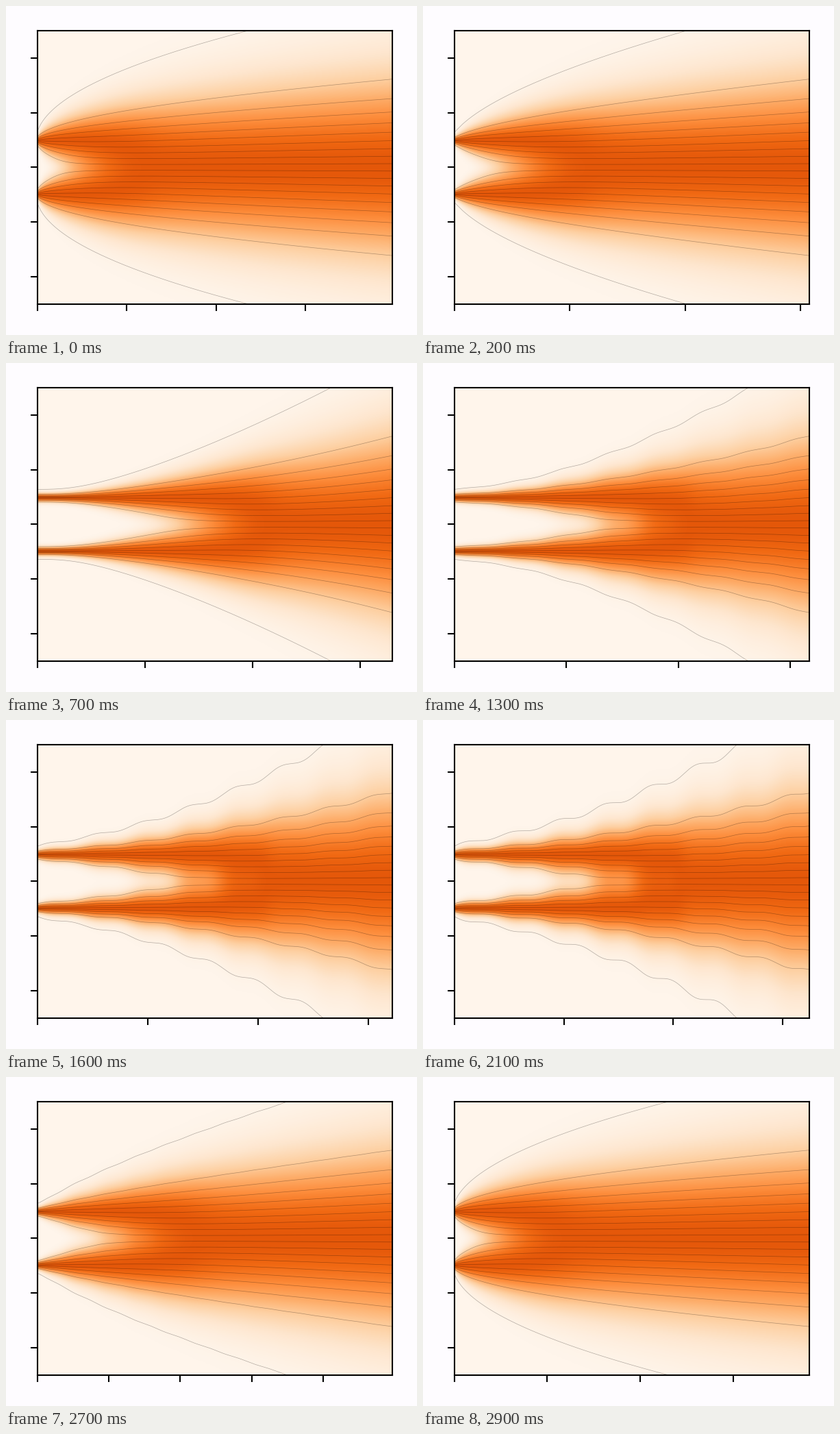
Animation, 600 px wide and 480 px high, one loop 3 s. Source, as a matplotlib script:

```python
import math

import matplotlib.pyplot as plt
import numpy as np
from matplotlib.animation import FuncAnimation

FRAMES, STEP_MS = 30, 100
WIDTH, HEIGHT = 600, 480
SOURCE = 0.98          # the two sources sit at +-SOURCE
START_STD = 0.1
END_VAR = 3.04         # the time axis is cut where this variance is reached
HALF = 5
OMEGA = 30
GAMMA = 0.78
COLS, ROWS = 519, 398


def ease(w):
    return 0.5 - 0.5 * math.cos(math.pi * min(max(w, 0), 1))


def soft_ease(w):
    w = min(max(w, 0), 1)
    return w ** 3 * (10 - 15 * w + 6 * w * w)


def spread(frame):
    """Return the total time and the standard deviation in every column."""
    power = 1 + 2.02 * ease(frame / 9.2) * soft_ease((FRAMES - frame) / 8.3)
    wave = ease((frame - 9) / 10) * ease((29 - frame) / 8)
    rate = 0.763 + 0.09 * wave
    linear = 0.2 * wave

    def variance(t):
        warped = np.maximum(t + wave * np.sin(OMEGA * t) / OMEGA, 0)
        growth = (1 - linear) * warped ** power + linear * warped
        return START_STD ** 2 + rate * growth

    t = np.linspace(0, 4.3, 3000)
    total = np.interp(END_VAR, variance(t), t)
    return total, np.sqrt(variance(u * total))


erf = np.vectorize(math.erf)


def quantile_table(stds, probs):
    """Positions of the upper quantiles of the two-peak density, by bisection."""
    root = stds[:, None] * math.sqrt(2)
    low = np.zeros((len(stds), len(probs)))
    high = np.full_like(low, 12)
    for _ in range(40):
        mid = (low + high) / 2
        cdf = 0.5 + 0.25 * (erf((mid - SOURCE) / root)
                            + erf((mid + SOURCE) / root))
        below = cdf < probs
        low = np.where(below, mid, low)
        high = np.where(below, high, mid)
    return low


u = np.linspace(0, 1, COLS + 1)
y = (np.arange(ROWS) + 0.5) / ROWS * 2 * HALF - HALF
probs = np.linspace(0.0007, 0.9993, 20)[10:]
stds = np.geomspace(START_STD, math.sqrt(END_VAR) + 0.01, 160)
table = quantile_table(stds, probs)

fig = plt.figure(figsize=(WIDTH / 100, HEIGHT / 100), dpi=100,
                 facecolor="#fefcff")
ax = fig.add_axes([45.6 / WIDTH, 45.2 / HEIGHT, 518.6 / WIDTH, 398.8 / HEIGHT])
ax.set_xlim(0, 1)
ax.set_ylim(-HALF, HALF)
ax.set_yticks(range(-4, 5, 2))
ax.tick_params(length=7, width=1.5, labelbottom=False, labelleft=False)
for spine in ax.spines.values():
    spine.set_linewidth(1.5)

image = ax.imshow(np.zeros((ROWS, COLS + 1)), cmap="Oranges", vmin=0, vmax=1.45,
                  extent=(0, 1, -HALF, HALF), origin="lower", aspect="auto",
                  interpolation="bilinear")
lines = [ax.plot([], [], color="black", lw=0.5, alpha=0.3)[0]
         for _ in range(2 * len(probs))]


def draw(frame):
    total, std = spread(frame)
    density = sum(np.exp(-(y[:, None] - c) ** 2 / (2 * std ** 2))
                  for c in (-SOURCE, SOURCE))
    image.set_data((density / density.max(axis=0)) ** GAMMA)

    for k in range(len(probs)):
        path = np.interp(std, stds, table[:, k])
        lines[2 * k].set_data(u, path)
        lines[2 * k + 1].set_data(u, -path)

    gap = 0.5 if total < 2.6 else 1
    ax.set_xticks(np.arange(0, total, gap) / total)
    return [image, *lines]


anim = FuncAnimation(fig, draw, frames=FRAMES, interval=STEP_MS,
                     repeat=True, repeat_delay=0, blit=False)
plt.show()
```
